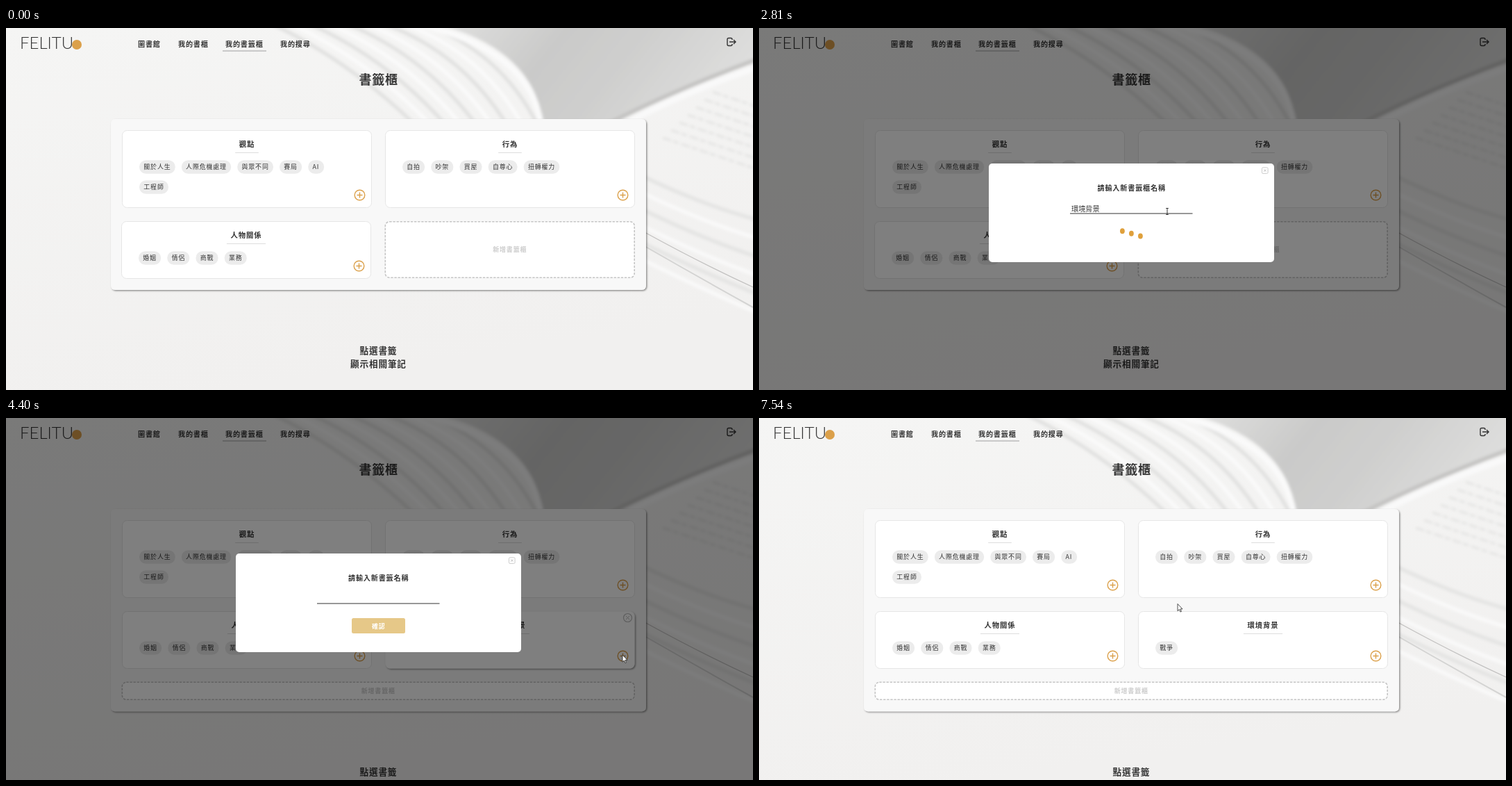
An HTML page for the animation above (8000 ms loop, 1076 px wide and 521 px high).

```html
<!DOCTYPE html>
<html lang="zh-Hant">
<head>
<meta charset="utf-8">
<title>書籤櫃</title>
<style>
html, body { margin: 0; width: 100%; height: 100%; overflow: hidden; background: #f2f2f1; }
svg { display: block; }
text { font-family: "Noto Sans CJK TC", "Noto Sans CJK", "Noto Sans", sans-serif; letter-spacing: .84px; fill: #333; }
.logo { font: 300 24px Lato, sans-serif; letter-spacing: 0; }
.typed { letter-spacing: 0; }
.line { fill: none; }
</style>
</head>
<body>
<svg width="1076" height="521" viewBox="0 0 1076 521">
  <defs>
    <linearGradient id="base" x2=".3" y2="1">
      <stop stop-color="#f5f5f4"/><stop offset="1" stop-color="#f1f0ef"/>
    </linearGradient>
    <linearGradient id="cover" x2="1" y2=".25">
      <stop stop-color="#e2e2e1"/><stop offset=".4" stop-color="#cacac9"/>
      <stop offset=".65" stop-color="#cfcfce"/><stop offset="1" stop-color="#dededd"/>
    </linearGradient>
    <filter id="soft" x="-20%" y="-20%" width="140%" height="140%"><feGaussianBlur stdDeviation="2.2"/></filter>
    <filter id="shade" x="-20%" y="-20%" width="140%" height="140%">
      <feDropShadow dx="1.3" dy="1.3" stdDeviation="1.1" flood-opacity=".45"/>
    </filter>
  </defs>
  <g id="book"></g>
  <g id="live"></g>
</svg>
<script>
const LOOP = 8000, INK = '#333', GOLD = '#dba04a';
const OPEN1 = 740, SEND1 = 2530, DONE1 = 2870, OPEN2 = 4400, SEND2 = 7270, DONE2 = 7540;
const $ = id => document.getElementById(id);

const text = (x, cy, s, size, o = '') =>
  `<text x="${x}" y="${cy + size * .37}" font-size="${size}" ${o}>${s}</text>`;
const mid = (x, cy, s, size, o = '') => text(x, cy, s, size, 'text-anchor="middle" ' + o);
const rect = (x, y, w, h, r, fill, o = '') =>
  `<rect x="${x}" y="${y}" width="${w}" height="${h}" rx="${r}" fill="${fill}" ${o}/>`;
const line = (d, color, w = 1, o = '') =>
  `<path class="line" d="${d}" stroke="${color}" stroke-width="${w}" ${o}/>`;
const circle = (x, y, r, o) => `<circle cx="${x}" cy="${y}" r="${r}" ${o}/>`;
const range = (n, f) => Array.from({ length: n }, (_, i) => f(i)).join('');
const BOLD = 'font-weight="700"';

function book() {
  const leaves = range(9, i => {
    const x = 385 + 27 * i;
    return line(`M${x} -5Q${x + 110} ${48 - 2 * i} ${590 + 22 * i} 140`, i % 2 ? '#fbfbfb' : '#e0e0df', 5);
  });
  const words = range(7, i =>
    line(`M${1018 - 12 * i} ${92 + 11 * i}L1090 ${116 + 15 * i}`, '#dcdcdb', 2.5, 'stroke-dasharray="13 3 8 4"'));
  const edges = range(6, i =>
    line(`M900 ${205 + 24 * i}Q1000 ${255 + 24 * i} 1090 ${278 + 27 * i}`, i % 2 ? '#fafafa' : '#e3e3e2', 5));
  return rect(0, 0, 1076, 521, 0, 'url(#base)') +
    `<g filter="url(#soft)">${leaves}
      <path d="M612 -8Q762 28 774 140H870Q960 92 1090 42V-8Z" fill="url(#cover)"/>
      ${line('M590 -6Q755 30 771 140', '#fafafa', 8)}
      ${line('M865 139Q960 90 1090 42', '#c3c2c1', 6)}
      ${line('M890 139Q975 92 1090 54', '#f9f9f9', 9)}
      ${edges}</g>
    <g filter="url(#soft)" opacity=".8">${words}</g>` +
    line('M920 294Q1000 338 1076 373', '#c2c1c0', 1.2) +
    line('M920 314Q1000 360 1076 402', '#d4d4d3', 2);
}

function header() {
  return text(20, 21.5, 'FELITU', 24, 'class="logo"') + circle(102, 24, 7, `fill="${GOLD}"`) +
    [[190, '圖書館'], [248, '我的書櫃'], [316, '我的書籤櫃'], [395, '我的搜尋']]
      .map(([x, s]) => text(x, 23, s, 10.1, BOLD)).join('') +
    line('M312 33H375', '#bbb', 1.6) +
    line('M1046 17V16.5Q1046 14.5 1044 14.5H1041Q1039 14.5 1039 16.5V23.5Q1039 25.5 1041 25.5H1044Q1046 25.5 1046 23.5V23M1042 20H1051M1048 17L1051 20L1048 23', INK, 1.4) +
    mid(536.7, 74, '書籤櫃', 18, BOLD);
}

function tags(x, cy, list) {
  return list.split(' ').map(s => {
    const w = (s === 'AI' ? 10.4 : s.length * 9.8) + 12.6;
    const out = rect(x, cy - 9.8, w, 19.6, 9.8, '#ececec') + text(x + 6.3, cy, s, 8.96);
    x += w + 9;
    return out;
  }).join('');
}

function card(x, y, h, title, list, extra = '', hover = false) {
  const cx = x + 180, half = title.length * 5.62 + 5.6, by = y + h - 17.5, bx = x + 342.5;
  return rect(x + .5, y + .5, 359, h, 7, '#fff', hover ? 'filter="url(#shade)"' : 'stroke="#e6e6e6"') +
    mid(cx, y + 20.5, title, 10.4, BOLD) +
    line(`M${cx - half} ${y + 32.5}H${cx + half}`, '#ddd') +
    (list && tags(x + 25, y + 53, list)) + extra +
    circle(bx, by, 7.3, `fill="none" stroke="${GOLD}" stroke-width="1.4"`) +
    line(`M${bx - 4} ${by}h8M${bx} ${by - 4}v8`, GOLD, 1.4) +
    (hover ? circle(x + 349.5, y + 9.5, 6, 'fill="none" stroke="#bbb" stroke-width="1.2"') +
      line(`M${x + 347} ${y + 7}l5 5m0 -5l-5 5`, '#bbb') : '');
}

function adder(x, y, w, h, hover) {
  return rect(x + .8, y + .8, w - 1.6, h - 1.6, 6, '#fff',
    `stroke="#c6c6c6" stroke-width="1.6" stroke-dasharray="3.4 1.7" ${hover ? 'filter="url(#shade)"' : ''}`) +
    mid(x + w / 2, y + h / 2, '新增書籤櫃', 8.96, `${BOLD} style="fill:${hover ? INK : '#ccc'}"`);
}

function page(t) {
  const grown = t >= DONE1, drop = grown ? 45.3 : 0;
  return header() +
    rect(151, 131, 771, 246 + drop, 6, '#f8f8f8', 'filter="url(#shade)"') +
    card(167, 147, 111, '觀點', '關於人生 人際危機處理 與眾不同 賽局 AI', tags(192, 229, '工程師')) +
    card(546, 147, 111, '行為', '自拍 吵架 買屋 自尊心 扭轉權力') +
    card(grown ? 167 : 166, 278, 82, '人物關係', '婚姻 情侶 商戰 業務') +
    (grown
      ? card(546, 278, 82, '環境背景', t >= DONE2 ? '戰爭' : '', '', t > 3480 && t < 4740) +
        adder(166.5, 379.5, 739.5, 26.5, false)
      : adder(545.5, 278, 360.5, 82, t > 400 && t < 870)) +
    mid(536.4, 464.5 + drop, '點選書籤', 12.65, BOLD) +
    mid(536.4, 483.5 + drop, '顯示相關筆記', 12.65, BOLD);
}

// [start, text, caret, composing]
const typing = [
  [OPEN1, ''], [1400, '', 1], [1860, ''], [2000, '環境背景', 1], [SEND1, '環境背景'],
  [OPEN2, ''], [5200, '', 1], [5670, ''], [6070, 'ㄓ', 1, 1], [6140, 'ㄓㄢ', 1, 1],
  [6340, '戰', 1, 1], [6600, '戰ㄓ', 1, 1], [6670, '戰ㄓㄥ', 1, 1], [6870, '戰爭', 1], [SEND2, '戰爭']
];

function modal(t) {
  const first = t < DONE1;
  const [, s, caret, composing] = typing.filter(k => k[0] <= t).pop();
  const end = 450 + 10.2 * s.length;
  const busy = t >= (first ? SEND1 : SEND2);
  const wave = (t - 2810) / 800 * 2 * Math.PI;
  return rect(0, 0, 1076, 521, 0, '#000', 'opacity=".5"') +
    rect(331, 195, 411, 142, 5, '#fff') +
    rect(724.5, 200.8, 8.6, 8.6, 1.5, 'none', 'stroke="#ccc"') +
    line('M727.2 203.5l3.2 3.2m0 -3.2l-3.2 3.2', '#bbb', .9) +
    mid(536.7, 230.5, first ? '請輸入新書籤櫃名稱' : '請輸入新書籤名稱', 10.1, BOLD) +
    line('M448 267H624.5', INK, 1.1) +
    text(450, 260.5, s, 10.2, 'class="typed"') +
    (composing ? line(`M450 265.3H${end}`, INK, .7) : '') +
    (caret ? line(`M${end + .5} 253V267`, INK, .8) : '') +
    (busy
      ? range(3, i => `<ellipse cx="${523.4 + 13 * i}" cy="${295.8 + 4.6 * Math.sin(wave + (i - 1) * .9)}" rx="3.4" ry="4" fill="#dfa03c"/>`)
      : rect(498, 288, 77, 22, 2.5, '#e6c888') + mid(536.8, 299.3, '確認', 8.96, `${BOLD} style="fill:#fff"`));
}

// [time, x, y] of the pointer tip
const path = [
  [200, 735, 515], [400, 712, 372], [600, 696, 346], [800, 696, 346], [940, 683, 304],
  [1010, 670, 293], [1270, 588, 264], [3340, 588, 264], [3700, 780, 338], [3900, 870, 358],
  [4130, 890, 341], [4330, 890, 341], [4400, 888, 341], [4530, 888, 341], [4800, 720, 295],
  [5000, 608, 263], [5070, 602, 261], [5270, 602, 261], [5470, 603, 267.5], [LOOP, 603, 267.5]
];

function pointer(t, open) {
  if (t < path[0][0]) return '';
  const i = path.findIndex(k => k[0] > t), [t0, x0, y0] = path[i - 1], [t1, x1, y1] = path[i];
  const f = (t - t0) / (t1 - t0), x = x0 + (x1 - x0) * f, y = y0 + (y1 - y0) * f;
  const click = [[600, OPEN1], [1270, 1340], [4260, OPEN2], [5140, 5210]].some(([a, b]) => t >= a && t < b);
  const beam = open && x > 448 && x < 624 && y > 252 && y < 267;
  return (click ? circle(x - .5, y + 2, 8.8, 'fill="#ffff20" fill-opacity=".75" filter="url(#shade)"') : '') +
    `<g transform="translate(${x} ${y})">` + (beam
      ? line('M-1.8 -4.5H1.8M0 -4.5V4.5M-1.8 4.5H1.8', '#222', .9)
      : '<path d="M0 0V10.2L2.4 8L4 11.6L5.5 10.9L3.9 7.4H7Z" fill="#fff" stroke="#222" stroke-width=".8"/>') + '</g>';
}

let shown;
function frame(now) {
  const t = now % LOOP;
  const open = t >= OPEN1 && t < DONE1 || t >= OPEN2 && t < DONE2;
  const next = page(t) + (open ? modal(t) : '') + pointer(t, open);
  if (next !== shown) $('live').innerHTML = shown = next;
  requestAnimationFrame(frame);
}
$('book').innerHTML = book();
const start = performance.now();
requestAnimationFrame(now => frame(Math.max(0, now - start)));
</script>
</body>
</html>
```
